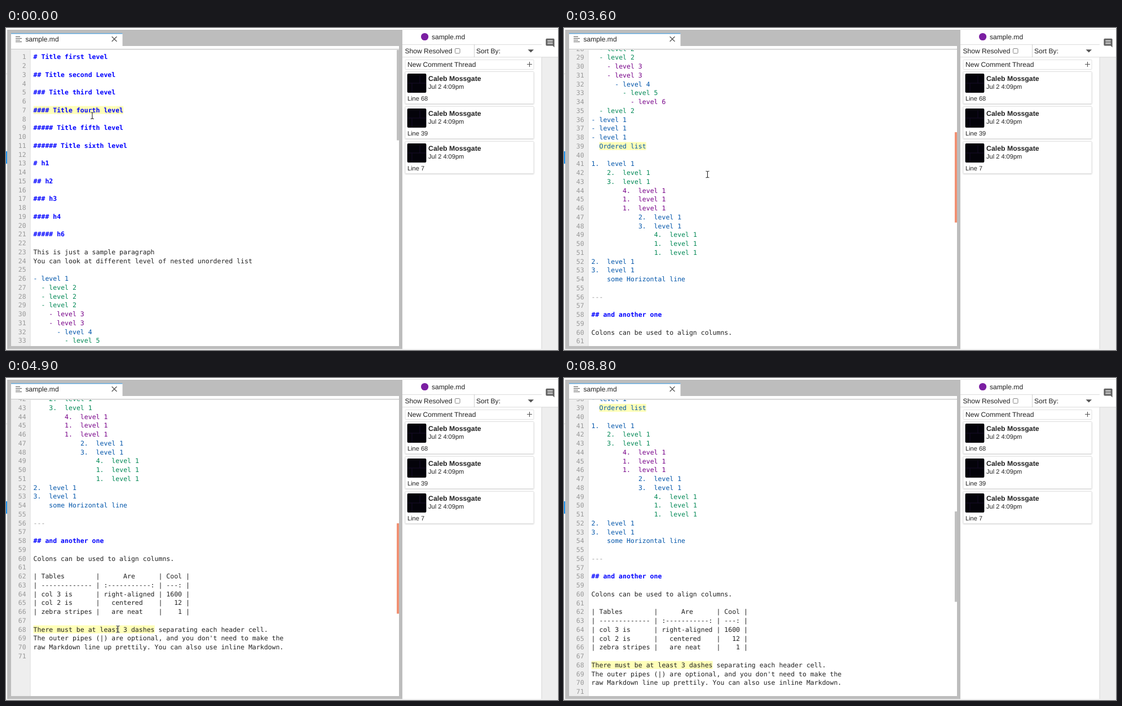
Write an HTML page that moves like this. It is 979 px wide and 572 px high and loops after 8.9 s.

```html
<!DOCTYPE html>
<html lang="en">
<head>
<meta charset="utf-8">
<title>Comments beside a document</title>
<style>
  html, body { margin: 0; width: 100%; height: 100%; overflow: hidden; background: #fff; }
  svg { display: block; width: 979px; height: 572px; }
  text { font-family: "Liberation Sans", Arial, sans-serif; font-size: 12.1px; fill: #212121;
         white-space: pre; text-rendering: geometricPrecision; }
  .code text { font-family: "DejaVu Sans Mono", monospace; font-size: 11.527px; }
  .code .num { fill: #999; text-anchor: end; }
  .code .h { fill: #00f; font-weight: bold; }
  .code .a { fill: #05a; }
  .code .b { fill: #085; }
  .code .c { fill: #708; }
  .code .r { fill: #999; }
  .name { font-weight: bold; font-size: 12.3px; }
  .small { font-size: 11.05px; }
  .card { fill: #fff; stroke: #e0e0e0; filter: drop-shadow(0 1px 1px rgba(0,0,0,.14)); }
</style>
</head>
<body>
<svg id="stage" viewBox="0 0 979 572"></svg>
<script>
const LOOP = 8900, CHAR = 6.94, PITCH = 15.75, LEFT = 48.6, TOP = 43.5, NOTCH = 44;
const AUTHOR = 'Caleb Mossgate', WHEN = 'Jul 2 4:09pm';

// Each row: style letter, then the text; "." is plain.
const source = `
h# Title first level

h## Title second Level

h### Title third level

h#### Title fourth level

h##### Title fifth level

h###### Title sixth level

h# h1

h## h2

h### h3

h#### h4

h##### h6

.This is just a sample paragraph
.You can look at different level of nested unordered list

a- level 1
b  - level 2
b  - level 2
b  - level 2
c    - level 3
c    - level 3
a      - level 4
b        - level 5
c          - level 6
b  - level 2
a- level 1
a- level 1
a- level 1
a  Ordered list

a1.  level 1
b    2.  level 1
b    3.  level 1
c        4.  level 1
c        1.  level 1
c        1.  level 1
a            2.  level 1
a            3.  level 1
b                4.  level 1
b                1.  level 1
b                1.  level 1
a2.  level 1
a3.  level 1
a    some Horizontal line

r---

h## and another one

.Colons can be used to align columns.

.| Tables        |      Are      | Cool |
.| ------------- | :-----------: | ---: |
.| col 3 is      | right-aligned | 1600 |
.| col 2 is      |   centered    |   12 |
.| zebra stripes |   are neat    |    1 |

.There must be at least 3 dashes separating each header cell.
.The outer pipes (|) are optional, and you don't need to make the
.raw Markdown line up prettily. You can also use inline Markdown.
`.slice(1).split('\n');

const rect = (x, y, w, h, fill, extra = '') =>
  `<rect x="${x}" y="${y}" width="${w}" height="${h}" fill="${fill}" ${extra}/>`;
const text = (x, y, str, cls = '', extra = '') =>
  `<text x="${x}" y="${y}" class="${cls}" ${extra}>${str}</text>`;
const path = (d, color, width = 1) =>
  `<path d="${d}" fill="none" stroke="${color}" stroke-width="${width}"/>`;
const group = (id, body) => `<g id="${id}">${body}</g>`;

const lineTop = n => TOP + (n - 1) * PITCH;
const mark = (n, from, len) =>
  rect(LEFT + from * CHAR, lineTop(n) + .6, len * CHAR, 14.2, '#ffffb8', `id="mark${n}"`);

function codeLine(row, i) {
  const y = lineTop(i + 1) + 11.87;
  const body = row.slice(1), indent = body.length - body.trimStart().length;
  return text(35.6, y, i + 1, 'num') +
    (row ? text(LEFT + indent * CHAR, y, body.trimStart(), row[0]) : '');
}

function author(y) {
  return rect(711.6, y, 33.8, 34, '#04030a', 'rx="2"') +
    path(`M712 ${y + 17}h33M720 ${y + 17}v17M734 ${y + 4}v13`, '#170d29') +
    text(749, y + 12.6, AUTHOR, 'name');
}

function listCard(line, i) {
  const y = 77.5 + i * 62;
  return rect(708, y, 228, 57, '#fff', 'class="card" rx="1"') + author(y + 3.5) +
    text(749, y + 30.7, WHEN, 'small') + text(712, y + 51, 'Line ' + line, 'small');
}

const frame =
  rect(2, 3, 701, 567.5, '#bdbdbd') + rect(0, 219, 2, 22, '#2196f3') +
  rect(0, 81, 2, 1, '#ddd') +
  rect(9, 9.2, 197.6, 24, '#fff') + rect(9, 9.2, 197.6, 1.3, '#4b9ad4') +
  rect(9, 32, 688, 533, '#fff') + rect(9, 37, 688, 1.4, '#c8c8c8') +
  path('M17 15.5h8M17 18.5h11M17 21.5h8M17 24.5h11', '#555', 1.2) +
  text(34.5, 24, 'sample.md') +
  path('M187.7 15.2l8.8 8.8m0-8.8l-8.8 8.8', '#555', 1.3);

const editor =
  `<clipPath id="view"><rect x="9" y="38.5" width="688" height="526.5"/></clipPath>
  <g clip-path="url(#view)">` +
  rect(9, 38, 34, 527, '#eee') + rect(42.6, 38, 1, 527, '#ddd') +
  `<g id="code" class="code">` +
  mark(7, 0, 23) + mark(39, 2, 12) + mark(68, 0, 31) +
  source.map(codeLine).join('') + rect(0, 0, 1, 15.8, '#000', 'id="caret"') +
  '</g>' + rect(693, 39, 4, 160.5, '#c0c0c0', 'id="bar"') + '</g>';

const side =
  rect(703, 2, 276, 1, '#e0e0e0') + rect(950, 52, 29, 518, '#eee') +
  rect(949.5, 52, 1, 518, '#d6d6d6') + rect(950, 51.3, 29, 1, '#d6d6d6') +
  rect(0, 570.5, 979, 1, '#e4e4e4') +
  '<path d="M959 18.8h12a1.6 1.6 0 0 1 1.6 1.6v14l-3-3H959a1.6 1.6 0 0 1-1.6-1.6v-9.4a1.6 1.6 0 0 1 1.6-1.6z" fill="#616161"/>' +
  path('M960.3 22.3h9.4M960.3 25h9.4M960.3 27.7h9.4', '#fff', 1.2) +
  '<circle cx="742.6" cy="15.5" r="6.6" fill="#7b1fa2"/>' +
  text(755, 19.7, 'sample.md');

const list =
  rect(703, 29, 247, 1, '#dcdcdc') + rect(703, 51.3, 247, 1, '#dcdcdc') +
  rect(830, 29, 1, 23, '#d0d0d0') +
  text(707.5, 45, 'Show Resolved') + text(834, 45, 'Sort By:') +
  rect(796.5, 36.5, 8.5, 8.5, '#fff', 'rx="1.5" stroke="#858585"') +
  '<path d="M925.5 38.3h10.6l-5.3 5.3z" fill="#555"/>' +
  rect(708, 56.5, 228, 17, '#fff', 'stroke="#e0e0e0" rx="1"') +
  text(712, 69, 'New Comment Thread') +
  path('M924 64.5h9M928.5 60v9', '#555', 1.2) +
  [68, 39, 7].map(listCard).join('');

const thread =
  rect(738, 29, 128, 1, '#e6e6e6') +
  path('M718.3 15.6h-9.6M713.3 10.6l-5 5l5 5', '#212121', 1.5) +
  rect(708, 34, 228, 90.5, '#fff', 'class="card" rx="1"') + author(37.5) +
  text(749, 64.3, '', 'small', 'id="when"') + text(712, 85, '', 'small', 'id="line"') +
  text(876, 50, 'Resolve', 'small', 'style="fill:#2196f3"') +
  rect(712.2, 95.5, 219, 21.5, '#f3f3f3', 'rx="1.5" stroke="#949494"') +
  text(716.5, 110, 'Reply...', 'small', 'style="fill:#858585"');

const beam = 'M-3-5.8q3 0 3 1.4q0-1.4 3-1.4M0-4.4v8.8M-3 5.8q3 0 3-1.4q0 1.4 3 1.4';
const pointers =
  group('beam', path(beam, '#fff', 2.2) + path(beam, '#222', 1.1)) +
  group('arrow', '<path d="M0 0v12.5l3-2.7l2.2 4.8l2.2-1l-2.1-4.6h4z" fill="#111" stroke="#fff" stroke-width=".8"/>') +
  group('hand', '<path d="M-1.2 0.6q1.2-1.2 2.2 0v4l5 1.2q1 .4 .8 1.8l-1 5h-7l-4-5.2q.4-1.4 2-.6l2 1.4z" fill="#111" stroke="#fff" stroke-width=".8"/>');

const stage = document.getElementById('stage');
stage.innerHTML = frame + editor + side + group('list', list) + group('thread', thread) + pointers;
const el = id => document.getElementById(id);

// Stepped tracks: [start time, value...]; scroll counts wheel notches.
const scroll = [[0, 0], [3000, 5], [3100, 6], [3200, 7], [3300, 8], [3500, 9], [3600, 10],
  [3700, 11], [3800, 13], [3900, 14], [4300, 15], [5100, 13.56]];
const panel = [[0, 0], [400, 7], [2400, 0], [5100, 68], [7400, 0]];
const strong = [[0, 0], [500, 7], [2400, 0], [5100, 68], [7500, 0]];
const caret = [[0, 0], [400, 7, 153], [900, 0], [1500, 7, 153], [2000, 0],
  [5100, 68, 201.3], [5600, 0], [6200, 68, 201.3], [6700, 0]];
const pointer = [[0, 'beam', 153, 155.5], [100, 'beam', 157, 151], [200, 'beam', 154, 146],
  [700, 'beam', 190, 142], [800, 'beam', 290, 127], [900, 'beam', 400, 111], [1000, 'beam', 520, 94],
  [1100, 'beam', 620, 77], [1200, 'beam', 685, 56], [1300, 'arrow', 710.5, 35], [1400, 'arrow', 713, 29],
  [1500, 'hand', 717, 23], [1600, 'hand', 717, 21], [1700, 'hand', 716, 18], [2400, 'arrow', 733, 42],
  [3000, 'beam', 259, 255], [3500, 'beam', 254.5, 260], [4400, 'beam', 220, 385], [4500, 'beam', 199, 466],
  [4700, 'beam', 201, 458], [4800, 'beam', 200, 450], [4900, 'beam', 198.5, 446],
  [6000, 'beam', 600, 157], [6200, 'beam', 640, 70], [6400, 'beam', 672, 45], [6500, 'arrow', 698, 26],
  [6700, 'hand', 711, 20], [6800, 'hand', 714, 17], [6900, 'hand', 714, 14.5], [7100, 'hand', 713.5, 15],
  [7400, 'arrow', 711, 14], [7700, 'arrow', 686, 12], [7900, 'arrow', 402, 4], [8000, '']];

const at = (track, t) => track.findLast(step => step[0] <= t).slice(1);
const show = (id, on) => el(id).style.display = on ? '' : 'none';

function draw(t) {
  const [notches] = at(scroll, t), [open] = at(panel, t), [lit] = at(strong, t);
  const y = notches * NOTCH;
  el('code').setAttribute('transform', `translate(0 ${-y})`);
  el('bar').setAttribute('y', 39 + y * .332);
  el('bar').setAttribute('fill', t >= 400 && t < 8800 ? '#f19072' : '#c0c0c0');
  for (const n of [7, 68]) el('mark' + n).setAttribute('fill', n === lit ? '#ffff40' : '#ffffb8');

  show('list', !open);
  show('thread', open);
  const hover = t >= 1300 && t < 1500;
  el('when').innerHTML = hover ? 'Jul 2 4:0...<tspan x="809.5">• Edit</tspan>' : WHEN;
  el('line').textContent = 'Line ' + open;

  const [row, x] = at(caret, t);
  show('caret', row);
  if (row) {
    el('caret').setAttribute('x', x);
    el('caret').setAttribute('y', lineTop(row));
  }

  const [kind, px, py] = at(pointer, t);
  for (const id of ['beam', 'arrow', 'hand']) show(id, id === kind);
  if (kind) el(kind).setAttribute('transform', `translate(${px} ${py})`);
}

const start = performance.now();
function tick() {
  draw((performance.now() - start) % LOOP);
  requestAnimationFrame(tick);
}
tick();
</script>
</body>
</html>
```
